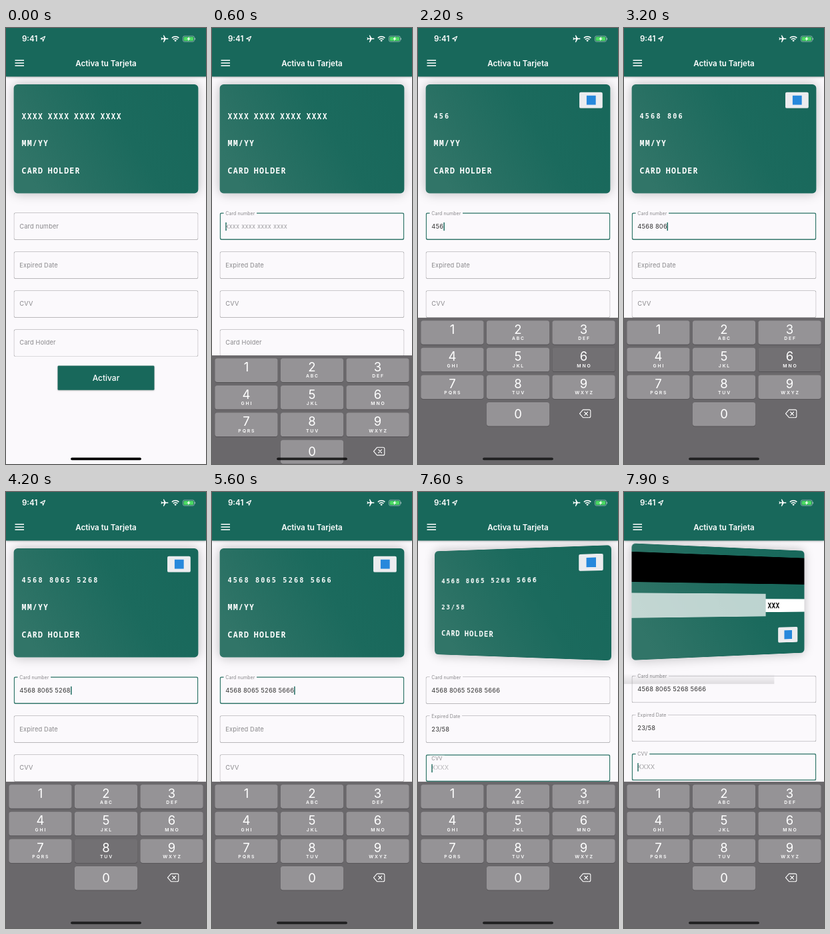
Recreate the animation shown at these times as an HTML page. Size 300 by 650 pixels, loop 8000 ms.

```html
<!DOCTYPE html>
<html lang="es">
<head>
<meta charset="utf-8">
<title>Activa tu Tarjeta</title>
<style>
:root { --teal: #18685b; --page: #fbf9fc; }
html, body { margin: 0; width: 100%; height: 100%; overflow: hidden; background: var(--page); }
* { box-sizing: border-box; }
#stage { position: relative; width: 300px; height: 650px; overflow: hidden; }
#stage div, #stage svg, label { position: absolute; white-space: pre; }

/* Laid out in device points, shown at stage size */
#phone { left: 0; top: 0; width: 414px; height: 897px; transform-origin: 0 0; transform: scale(calc(300 / 414)); background: var(--page); font-family: Inter, Roboto, sans-serif; }
#phone svg { left: 0; top: 0; }

.header { left: 0; top: 0; width: 414px; height: 100px; background: var(--teal); color: #fff; box-shadow: 0 1px 5px rgba(0,0,0,.45); }
.clock { left: 33px; top: 11px; font: 600 16px/22px Inter, sans-serif; }
.title { left: 0; width: 414px; top: 61px; text-align: center; font: 600 16px/22px Inter, sans-serif; }

#content { left: 0; top: 0; width: 414px; height: 897px; }
.card {
  left: 16px; top: 116px; width: 382px; height: 224px; border-radius: 8px;
  background: linear-gradient(239.6deg, #18685b 10%, #1b6a5d 40%, #287063 70%, #317568 90%);
  box-shadow: 0 0 24px rgba(0,0,0,.26);
  color: #fff; font: 700 16px/22px "Noto Sans Mono", "DejaVu Sans Mono", monospace;
  letter-spacing: 1.6px; word-spacing: -1.8px;
}
.card .line { left: 16.5px; }
.card .digits { font: 700 14px/22px "DejaVu Sans Mono", monospace; letter-spacing: 3px; word-spacing: 0; }
.logo { width: 48px; height: 33px; border-radius: 3px; background: #ececef; }
.logo::after { content: ""; position: absolute; left: 14.5px; top: 7px; width: 19px; height: 19px; background: #2788dc; }
.stripe { left: 0; top: 16px; width: 382px; height: 58px; background: #000; }
.sign { left: 0; top: 95px; width: 286.5px; height: 48px; background: rgba(255,255,255,.71); }
.code { left: 286.5px; top: 106px; width: 95.5px; height: 28px; padding-left: 5px; background: #fff; color: #000; line-height: 28px; letter-spacing: 0; }
#band { left: 0; top: 375px; width: 310.5px; height: 19.5px; background: linear-gradient(rgba(0,0,0,.01), rgba(0,0,0,.11)); }

.field { left: 16px; width: 382px; height: 56px; border-radius: 4px; box-shadow: inset 0 0 0 1px #a5a4a7; font-size: 12.8px; line-height: 16px; }
.field.on { box-shadow: inset 0 0 0 2px #35796d; }
.field label { left: 7px; top: 20px; padding: 0 5px; letter-spacing: .2px; color: #89888b; background: var(--page); transform-origin: 5px 50%; }
.entry { left: 12px; top: 20px; height: 16px; display: flex; align-items: center; letter-spacing: .28px; color: #333; }
.caret { width: 2px; height: 17px; margin-right: -2px; background: var(--teal); }
.hint { color: #a09fa2; }
.button { left: 107px; top: 695px; width: 200px; height: 50px; border-radius: 2px; background: var(--teal); color: #fff; text-align: center; font: 500 16.5px/50px Inter, sans-serif; box-shadow: 0 1px 3px rgba(0,0,0,.3); }

#keyboard { left: 0; top: 596px; width: 414px; height: 301px; background: #6a686b; color: #fff; }
.key { width: 130px; height: 49px; border-radius: 5px; background: #959396; box-shadow: 0 1px 0 #4b494c; text-align: center; }
.key.down { background: #727073; }
.key b { display: block; font: 400 25.5px/36px Inter, sans-serif; }
.key small { display: block; margin-top: -5px; font: 600 9.4px/12px Inter, sans-serif; letter-spacing: 2.6px; text-indent: 2.6px; }
#home { left: 134px; top: 884px; width: 146px; height: 5px; border-radius: 2.5px; background: #000; }
</style>
</head>
<body>
<div id="stage"><div id="phone">
  <div id="content">
    <div class="card" id="front">
      <div class="line" id="cardNumber" style="top:54px"></div>
      <div class="line" id="cardDate" style="top:110px"></div>
      <div class="line" style="top:166px">CARD HOLDER</div>
      <div class="logo" id="logo" style="left:318px;top:16px"></div>
    </div>
    <div class="card" id="back">
      <div class="stripe"></div>
      <div class="sign"></div>
      <div class="code">XXX</div>
      <div class="logo" style="left:317px;top:167px"></div>
    </div>
    <div class="button">Activar</div>
  </div>
  <div id="band"></div>
  <div class="header">
    <div class="clock">9:41</div>
    <svg width="414" height="100" viewBox="0 0 300 72.46" fill="none" stroke="#fff">
      <path d="M58.6 12.6L51.6 15.9L55 16.4L55.5 19.8Z" stroke-width="1.1" stroke-linejoin="round"/>
      <path transform="translate(238 16) rotate(90) scale(.55) translate(-11.5 -12)" fill="#fff" stroke="none" d="M21 16v-2l-8-5V3.5c0-.8-.7-1.5-1.5-1.5S10 2.7 10 3.5V9l-8 5v2l8-2.5V19l-2 1.5V22l3.5-1 3.5 1v-1.5L13 19v-5.5l8 2.5z"/>
      <path stroke-width="1.7" d="M248.9 14.9a7.3 7.3 0 0 1 10.4 0M250.9 17.1a4.5 4.5 0 0 1 6.4 0"/>
      <path fill="#fff" stroke="none" d="M252.4 18.7a2.4 2.4 0 0 1 3.4 0l-1.7 1.8z"/>
      <rect x="265.4" y="12" width="17" height="8.4" rx="2.3" stroke-opacity=".55" stroke-width=".8"/>
      <rect x="266.6" y="13.2" width="14.6" height="6" rx="1.2" fill="#4cd964" stroke="none"/>
      <path d="M283.5 14.8v2.8" stroke-opacity=".55"/>
      <path fill="#fff" stroke="none" d="M275.2 12.6l-3.8 4.1h2.2l-.9 3.1 3.8-4.2h-2.2z"/>
      <path stroke-width="1.45" d="M13.5 48.2h13.5M13.5 52.2h13.5M13.5 56.2h13.5"/>
    </svg>
    <div class="title">Activa tu Tarjeta</div>
  </div>
  <div id="keyboard">
    <svg width="414" height="301" viewBox="0 0 300 218.1" fill="none" stroke="#fff" stroke-width="1.1" stroke-linejoin="round" stroke-linecap="round">
      <path d="M247.5 137.2h9.3a2 2 0 0 1 2 2v7.6a2 2 0 0 1-2 2h-9.3l-5-5.8z"/>
      <path d="M249.7 140.6l4.8 4.8m0-4.8l-4.8 4.8"/>
    </svg>
  </div>
  <div id="home"></div>
</div></div>
<script>
const LOOP = 8000, STEP = 100;
const FLIP = 7506, FLIP_TIME = 500;
const KEYBOARD_HEIGHT = 301;
const $ = id => document.getElementById(id);
const clamp = x => Math.min(1, Math.max(0, x));
const progress = (t, start, length) => clamp((t - start) / length);

// cubic-bezier(.42, 0, 1, 1), solved by bisection
function easeIn(x) {
  let low = 0, high = 1, s = .5;
  for (let i = 0; i < 24; i++) {
    s = (low + high) / 2;
    const at = 1.26 * s * (1 - s) ** 2 + 3 * (1 - s) * s * s + s ** 3;
    if (at < x) low = s; else high = s;
  }
  return 3 * s * s - 2 * s ** 3;
}

function add(parent, tag, className, text = '') {
  const el = document.createElement(tag);
  el.className = className;
  el.textContent = text;
  parent.append(el);
  return el;
}

// label, focus start and end, hint
const fields = [
  ['Card number', 300, 5700, 'xxxx xxxx xxxx xxxx'],
  ['Expired Date', 5700, 7500, 'XX/XX'],
  ['CVV', 7500, LOOP, 'XXXX'],
  ['Card Holder', Infinity, Infinity, '']
].map(([name, from, to, hint], i) => {
  const box = add($('content'), 'div', 'field');
  box.style.top = 380 + 80 * i + 'px';
  const label = add(box, 'label', '', name);
  const entry = add(box, 'div', 'entry');
  const value = add(entry, 'span', 'value');
  const caret = add(entry, 'span', 'caret');
  const hintEl = add(entry, 'span', 'hint', hint);
  return { box, label, value, caret, hintEl, from, to };
});

const letters = ['', 'ABC', 'DEF', 'GHI', 'JKL', 'MNO', 'PQRS', 'TUV', 'WXYZ'];
const keys = {};
for (let i = 0; i < 10; i++) {
  const digit = (i + 1) % 10;
  const col = digit ? i % 3 : 1;
  const key = add($('keyboard'), 'div', 'key');
  key.style.left = 6 + col * 136 + 'px';
  key.style.top = 6 + Math.floor(i / 3) * 56 + 'px';
  const number = add(key, 'b', '', digit);
  if (digit) add(key, 'small', '', letters[i]);
  else number.style.lineHeight = '48px';
  keys[digit] = key;
}

// [time, digit]: a key is held 200 ms, its digit shows after 100 ms
const numberTaps = [
  [1200, 4], [1900, 5], [2100, 6], [2400, 8],
  [2600, 8], [2800, 0], [3100, 6], [3300, 5],
  [3600, 5], [3800, 2], [3900, 6], [4100, 8],
  [4400, 5], [4600, 6], [4800, 6], [4900, 6], [5400, 5]
];
const dateTaps = [[5900, 2], [6300, 3], [6500, 5], [6700, 8], [6900, 0], [7000, 8]];
const taps = [...numberTaps, ...dateTaps];

const typed = (list, t, max) =>
  list.filter(([at]) => t >= at + 100).map(tap => tap[1]).join('').slice(0, max);

function showLine(el, value, placeholder) {
  el.textContent = value || placeholder;
  el.classList.toggle('digits', value !== '');
}

function turn(card, degrees, visible) {
  card.style.visibility = visible ? 'visible' : 'hidden';
  card.style.transform = degrees ? `perspective(1000px) rotateY(${degrees}deg)` : 'none';
}

function render(t) {
  const number = typed(numberTaps, t, 16).replace(/(.{4})(?=.)/g, '$1 ');
  const date = typed(dateTaps, t, 4).replace(/^(..)(?=.)/, '$1/');
  const values = [number, date, '', ''];

  fields.forEach((f, i) => {
    const on = t >= f.from && t < f.to;
    const lift = progress(t, f.from - 50, 200);
    f.box.classList.toggle('on', on);
    f.label.style.transform = `translateY(${-26 * lift}px) scale(${1 - lift / 4})`;
    f.value.textContent = values[i];
    f.caret.style.display = on ? 'block' : 'none';
    f.hintEl.style.display = on && !values[i] ? 'block' : 'none';
    f.hintEl.style.opacity = lift;
  });

  showLine($('cardNumber'), number, 'XXXX XXXX XXXX XXXX');
  showLine($('cardDate'), date, 'MM/YY');
  $('logo').style.display = number ? 'block' : 'none';

  for (const digit in keys) {
    const down = taps.some(([at, d]) => d == digit && t >= at && t < at + 200);
    keys[digit].classList.toggle('down', down);
  }
  const rise = 1 - (1 - progress(t, 400, 550)) ** 3;
  $('keyboard').style.transform = `translateY(${KEYBOARD_HEIGHT * (1 - rise)}px)`;
  $('home').style.opacity = 1 - .3 * rise;

  const flip = progress(t, FLIP, FLIP_TIME);
  turn($('front'), -90 * easeIn(clamp(flip * 2)) * (flip > 0), flip < .5);
  turn($('back'), 90 * easeIn(clamp(2 - flip * 2)), flip >= .5);
  $('band').style.visibility = flip > .7 ? 'visible' : 'hidden';
  $('content').style.transform = `translateY(${-2.2 * progress(t, 7600, 200)}px)`;
}

// The picture advances ten times a second
const start = performance.now();
function tick() {
  const t = (performance.now() - start) % LOOP;
  render(Math.floor(t / STEP) * STEP);
  requestAnimationFrame(tick);
}
render(0);
requestAnimationFrame(tick);
</script>
</body>
</html>
```
